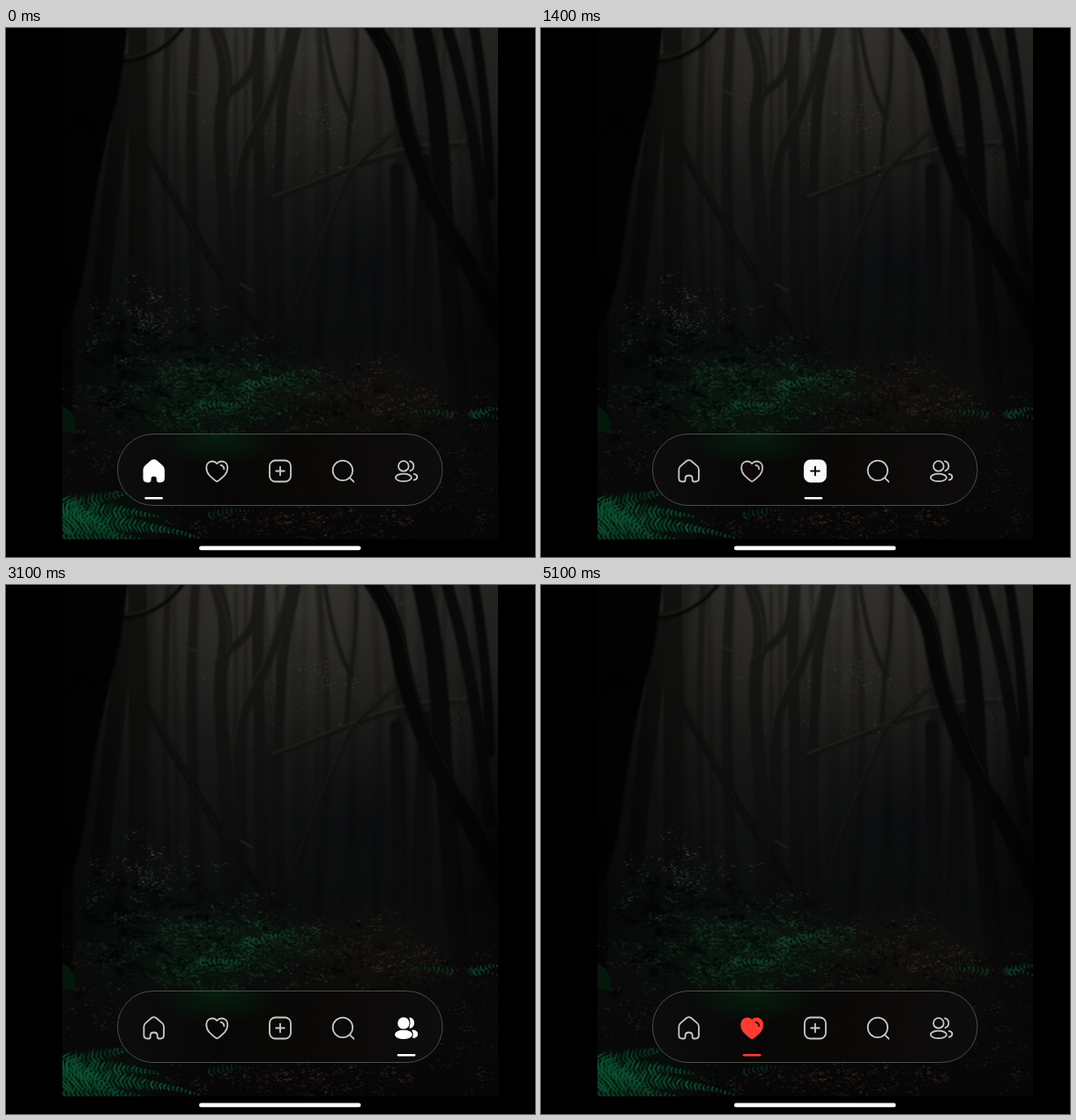
Write an HTML page with a canvas that moves like this. It is 600x600 px and loops after 5200 ms.

```html
<!DOCTYPE html>
<html lang="en">
<head>
<meta charset="utf-8">
<title>Tab bar</title>
<style>
  html, body { margin: 0; width: 100%; height: 100%; overflow: hidden; background: #000; }
  canvas, svg { position: absolute; left: 0; top: 0; width: 600px; height: 600px; display: block; }
</style>
</head>
<body>
<canvas id="forest" width="600" height="600"></canvas>
<svg viewBox="0 0 600 600">
  <defs>
    <radialGradient id="moss" gradientUnits="userSpaceOnUse" cx="0" cy="0" r="1" gradientTransform="translate(240 463) scale(75 36)">
      <stop offset="0" stop-color="#061e0e"/>
      <stop offset="1" stop-color="#061e0e" stop-opacity="0"/>
    </radialGradient>
    <linearGradient id="glass">
      <stop offset="0" stop-color="#0d0d0d"/>
      <stop offset=".3" stop-color="#060706"/>
      <stop offset=".65" stop-color="#0b0908"/>
      <stop offset="1" stop-color="#0e0d0d"/>
    </linearGradient>
  </defs>
  <rect x="126.5" y="460.5" width="368.5" height="81" rx="40.5" fill="url(#glass)" fill-opacity=".96"/>
  <rect x="126.5" y="460.5" width="368.5" height="81" rx="40.5" fill="url(#moss)" stroke="#4c4c4a"/>
  <g id="icons" stroke-width="1.8" stroke-linecap="round" stroke-linejoin="round"></g>
  <rect id="bar" y="532" width="20.6" height="2.6" rx="1.3"/>
  <rect x="219" y="587.5" width="183.5" height="4.8" rx="2.4" fill="#fff"/>
</svg>
<script>
const LOOP = 5200, MOVE = 300;
const WHITE = [255, 255, 255], RED = [255, 59, 48];

// ---------- forest backdrop, painted once ----------
const ctx = document.getElementById('forest').getContext('2d');
let seed = 7;
const rnd = () => (seed = (seed * 16807) % 2147483647) / 2147483647;
const gauss = () => rnd() + rnd() + rnd() + rnd() - 2;

function glow(x, y, rx, ry, rgb, a) {
  ctx.save();
  ctx.translate(x, y);
  ctx.scale(rx, ry);
  const g = ctx.createRadialGradient(0, 0, 0, 0, 0, 1);
  g.addColorStop(0, `rgba(${rgb},${a})`);
  g.addColorStop(.5, `rgba(${rgb},${a * .45})`);
  g.addColorStop(1, `rgba(${rgb},0)`);
  ctx.fillStyle = g;
  ctx.fillRect(-1, -1, 2, 2);
  ctx.restore();
}

function fade(y, stops) {
  const g = ctx.createLinearGradient(0, 0, 0, y);
  stops.forEach(([o, c]) => g.addColorStop(o, c));
  return g;
}

function limb(d, width, color) {
  ctx.lineWidth = width;
  ctx.strokeStyle = color;
  ctx.stroke(new Path2D(d));
}

// Small leaves scattered in loose clumps
function leaves(n, x, y, sx, sy, rgb, a, size) {
  let cx, cy, tone;
  for (let i = 0; i < n; i++) {
    if (i % 9 === 0) {
      cx = x + gauss() * sx;
      cy = y + gauss() * sy;
      tone = a * (.35 + .65 * rnd());
    }
    ctx.fillStyle = `rgba(${rgb},${tone * (.3 + .7 * rnd())})`;
    ctx.beginPath();
    ctx.ellipse(cx + gauss() * 11, cy + gauss() * 6, size * (.5 + rnd()), size * (.3 + rnd() * .4), gauss() * .7, 0, 7);
    ctx.fill();
  }
}

// A frond bows from (x, y) by (dx, dy); leaflets shrink towards its tip
function frond(x, y, dx, dy, rise, len, rgb) {
  const n = Math.round(Math.hypot(dx, dy) / 5);
  for (let i = 1; i <= n; i++) {
    const u = i / n, turn = Math.atan2(dy - rise * 4 * (1 - 2 * u), dx);
    const px = x + dx * u, py = y + dy * u - rise * 4 * u * (1 - u);
    for (const side of [-1, 1]) {
      const l = len * (1.08 - u) * (.75 + rnd() * .4);
      ctx.save();
      ctx.translate(px, py);
      ctx.rotate(turn + side * (1 + gauss() * .12));
      ctx.fillStyle = `rgba(${rgb},${.35 + rnd() * .6})`;
      ctx.fill(new Path2D(`M0-1.2Q${l * .6}-2 ${l} 0Q${l * .5} 1.6 0 1.2Z`));
      ctx.restore();
    }
  }
}

function paintForest() {
  ctx.fillStyle = '#000';
  ctx.fillRect(0, 0, 600, 600);
  ctx.save();
  ctx.beginPath();
  ctx.rect(64, 0, 494, 580);
  ctx.clip();
  ctx.fillStyle = fade(580, [[0, '#252421'], [.15, '#1f1e1c'], [.3, '#181817'], [.45, '#111213'], [.6, '#0c0d0d'], [.75, '#090a09'], [1, '#070606']]);
  ctx.fillRect(64, 0, 494, 580);
  glow(320, 0, 210, 190, '72,69,62', .5);
  glow(410, 270, 100, 110, '5,6,8', .45);
  ctx.lineCap = 'round';
  ctx.lineJoin = 'round';

  // distant trunks
  ctx.filter = 'blur(1.5px)';
  for (let i = 0; i < 26; i++) {
    const x = 130 + i * 16 + gauss() * 8, w = 3 + rnd() * 6;
    limb(`M${x} -5Q${x + gauss() * 14} 160 ${x + gauss() * 9} 370`, w, `rgba(8,8,8,${.1 + rnd() * .25})`);
  }

  // canopy texture
  ctx.filter = 'blur(.5px)';
  leaves(900, 330, 95, 190, 85, '110,108,92', .2, 1.3);
  leaves(140, 310, 28, 36, 16, '45,84,48', .4, 1.9);
  leaves(110, 355, 105, 50, 20, '85,92,76', .36, 1.5);

  // middle trunks and branches, paler where the mist is bright
  ctx.filter = 'blur(.9px)';
  const near = fade(390, [[0, '#12110f'], [.4, '#0e0e0d'], [1, '#080808']]);
  const bark = fade(390, [[0, '#1b1a17'], [.35, '#131312'], [1, '#090909']]);
  const pale = fade(330, [[0, '#2b2924'], [1, '#151513']]);
  limb('M139 40Q120 170 106 312', 20, near);
  limb('M149 -5Q151 150 149 318', 22, near);
  limb('M184 0Q176 150 184 310', 8, bark);
  limb('M215 0Q200 130 218 330', 7, bark);
  limb('M160 138Q205 220 250 290T310 365', 8, near);
  limb('M236 -5Q254 40 247 78Q239 110 248 200Q253 300 260 380', 15, bark);
  limb('M249 76Q280 58 283 32L288 -5', 9, bark);
  limb('M324 -5Q306 75 286 114Q262 148 266 205L268 300', 9, bark);
  limb('M331 -5Q312 70 312 120Q304 230 314 360', 11, bark);
  limb('M288 -5Q283 70 288 160Q287 260 294 382', 13, bark);
  limb('M361 -5Q372 72 392 102', 5, bark);
  limb('M397 -5Q399 55 390 104L386 160', 5, bark);
  limb('M298 194Q355 174 392 159Q455 132 530 132', 7, bark);
  limb('M302 191Q355 171 392 156Q455 129 522 129', 1.8, '#2a2721');
  limb('M446 113Q414 139 391 164Q359 235 330 318', 5, bark);
  limb('M447 111Q414 137 389 162Q357 232 328 314', 1.4, pale);
  limb('M443 160L447 370M475 150L468 350', 14, '#0b0b0b');
  limb('M240 8Q257 42 251 77M317 12Q303 74 278 114Q260 145 260 182', 1.3, pale);
  limb('M205 70Q222 78 240 82M266 290L280 298', 1.8, '#2a271f');
  limb('M167 145Q205 220 240 274', 1, '#191916');
  leaves(120, 514, 155, 14, 22, '42,78,50', .4, 1.6);

  // near trunks
  limb('M470 -5Q492 80 495 190Q506 320 515 432', 21, '#080808');
  limb('M499 -5Q535 110 548 270', 13, '#090909');
  limb('M530 -5Q545 70 549 190', 11, '#080808');
  limb('M414 -5Q441 32 446 76Q464 170 512 246Q542 295 562 350', 19, '#060606');
  limb('M425 4Q450 40 453 77Q473 165 517 238', 1, '#191916');
  limb('M132 38Q176 34 203 -4', 4.2, '#080807');
  limb('M134 34Q171 31 196 2', 1, '#2a2a20');
  ctx.fillStyle = '#030303';
  ctx.fill(new Path2D('M60 -5H138Q133 60 117 115Q98 195 91 260Q82 325 60 350Z'));
  limb('M64 250V440', 24, 'rgba(3,3,3,.65)');
  glow(85, 200, 60, 220, '2,2,2', .7);
  glow(558, 300, 55, 210, '2,2,2', .8);

  // undergrowth
  ctx.filter = 'none';
  glow(215, 420, 150, 75, '8,30,19', .55);
  glow(310, 405, 70, 28, '12,36,23', .45);
  glow(410, 425, 130, 65, '24,20,17', .5);
  glow(105, 375, 90, 85, '4,6,5', .5);
  ctx.filter = 'blur(.4px)';
  leaves(330, 150, 335, 70, 38, '70,84,74', .45, 1.7);
  leaves(900, 205, 408, 100, 52, '32,80,52', .42, 2);
  leaves(480, 235, 430, 72, 28, '24,92,54', .45, 2);
  leaves(330, 300, 400, 52, 18, '38,92,58', .45, 1.9);
  leaves(400, 140, 385, 70, 65, '2,5,4', .75, 3.6);
  leaves(260, 250, 410, 90, 45, '2,6,4', .65, 3.2);
  leaves(700, 405, 420, 110, 42, '78,62,50', .42, 1.7);
  leaves(260, 405, 425, 100, 40, '4,4,4', .6, 2.6);
  leaves(320, 110, 465, 50, 55, '74,60,54', .38, 1.6);
  leaves(560, 320, 558, 150, 22, '84,62,50', .45, 1.7);
  leaves(300, 520, 490, 38, 70, '66,52,44', .4, 1.6);
  leaves(18, 415, 387, 8, 3, '130,72,40', .5, 1.7);
  leaves(3, 391, 161, 2, 1, '126,84,48', .7, 2);

  // ferns
  ctx.filter = 'blur(.6px)';
  glow(105, 562, 100, 45, '6,52,31', .4);
  frond(54, 552, 96, -26, 4, 17, '9,66,40');
  frond(52, 560, 120, -6, 8, 20, '11,78,47');
  frond(50, 566, 168, 12, 9, 20, '12,84,51');
  frond(56, 536, 78, 50, 4, 17, '12,86,52');
  frond(50, 580, 110, 2, 6, 16, '9,68,41');
  frond(225, 556, 55, -8, 4, 7, '8,44,28');
  frond(512, 440, -62, -4, 3, 7, '12,52,33');
  frond(525, 444, 36, -12, 4, 9, '13,64,40');
  frond(520, 440, 42, 4, 3, 8, '12,58,36');
  frond(270, 410, 60, -12, 5, 8, '18,72,45');
  frond(215, 430, 70, 4, 5, 8, '15,70,42');
  ctx.fillStyle = '#04170b';
  ctx.fill(new Path2D('M64 429Q83 437 78 462Q70 455 64 460Z'));
  ctx.restore();
}
paintForest();

// ---------- tab icons, drawn around their own centres ----------
const house = 'M-11.3-1.6Q-11.3-4-9.4-5.6L-2.6-11.5Q0-13.4 2.6-11.5L9.4-5.6Q11.3-4 11.3-1.6V8Q11.3 12 7.3 12H6Q4 12 4 10V8.4Q4 5 0 5T-4 8.4V10Q-4 12-6 12H-7.3Q-11.3 12-11.3 8Z';
const heart = 'M0 11.8Q-1.6 11.8-8.8 4.6C-13.4-.8-12.8-8-8.5-10.2C-5-11.8-2-10.8 0-8.4C2-10.8 5-11.8 8.5-10.2C12.8-8 13.4-.8 8.8 4.6Q1.6 11.8 0 11.8Z';
const shine = '<path d="M4.2-6.6Q8-6 8-2.2" fill="none"';
const square = '<rect x="-12" y="-12" width="24" height="24" rx="6.5"/>';
const plus = '<path d="M-4.8 0H4.8M0-4.8V4.8"';
const people = '<circle cx="-3.3" cy="-5.6" r="5.8"/><ellipse cx="-3.3" cy="7.4" rx="9" ry="4.3"/>';
const tabs = [
  { x: 167.7, on: `<path d="${house}"/>`, off: `<path d="${house}"/>` },
  { x: 239.3, color: RED,
    off: `<path d="${heart}"/>${shine}/>`,
    on: `<path d="${heart}"/>${shine} stroke="#1a0706"/>` },
  { x: 311, off: `${square}${plus}/>`, on: `${square}${plus} stroke="#080808" stroke-width="2"/>` },
  { x: 382.6,
    off: '<circle cx="-.7" cy="-.6" r="11.3"/><path d="M8 8.4L11.8 12.2"/>',
    on: '<circle cx="-1.4" cy="-1.3" r="10.7"/><path d="M8.3 8.8L11.2 11.6" stroke-width="2.8"/>' },
  { x: 454.2,
    off: people + '<path d="M3.8-11.2A5.7 5.7 0 0 1 4.4-.3M8.6 3.4C13.4 4.2 13.4 9 8.6 10.2" fill="none"/>',
    on: people + '<path d="M4.2-11.2A5.7 5.7 0 0 1 4.2-.5Q6.2-6 4.2-11.2ZM7.2 3C13.5 3.6 13.5 9.8 7.8 10.5Q9.4 6.5 7.2 3Z"/>' }
];

const rgb = c => `rgb(${c.map(Math.round)})`;
const icons = document.getElementById('icons');
icons.innerHTML = tabs.map(t => {
  const c = rgb(t.color || WHITE);
  return `<g transform="translate(${t.x} 502.5)"><g fill="none" stroke="#c9c9c7">${t.off}</g><g fill="${c}" stroke="${c}">${t.on}</g></g>`;
}).join('');
const layers = [...icons.children].map(g => g.children);
const bar = document.getElementById('bar');

// [start time, tab]
const taps = [[150, 1], [1150, 2], [1950, 3], [2800, 4], [3650, 2], [4500, 1]];
const easeOut = u => 1 - (1 - u) ** 2;

function draw(t) {
  let from = 0, to = 0, k = 1;
  for (const [at, tab] of taps) {
    if (t < at) break;
    from = to;
    to = tab;
    k = easeOut(Math.min(1, (t - at) / MOVE));
  }
  const mix = (a, b) => a + (b - a) * k;
  layers.forEach(([off, on], i) => {
    const a = i === to ? k : i === from ? 1 - k : 0;
    off.setAttribute('opacity', 1 - a);
    on.setAttribute('opacity', a);
  });
  const a = tabs[from], b = tabs[to], ca = a.color || WHITE, cb = b.color || WHITE;
  bar.setAttribute('x', mix(a.x, b.x) - 10.4);
  bar.setAttribute('fill', rgb(ca.map((v, i) => mix(v, cb[i]))));
}

const start = performance.now();
function tick() {
  draw((performance.now() - start) % LOOP);
  requestAnimationFrame(tick);
}
tick();
</script>
</body>
</html>
```
